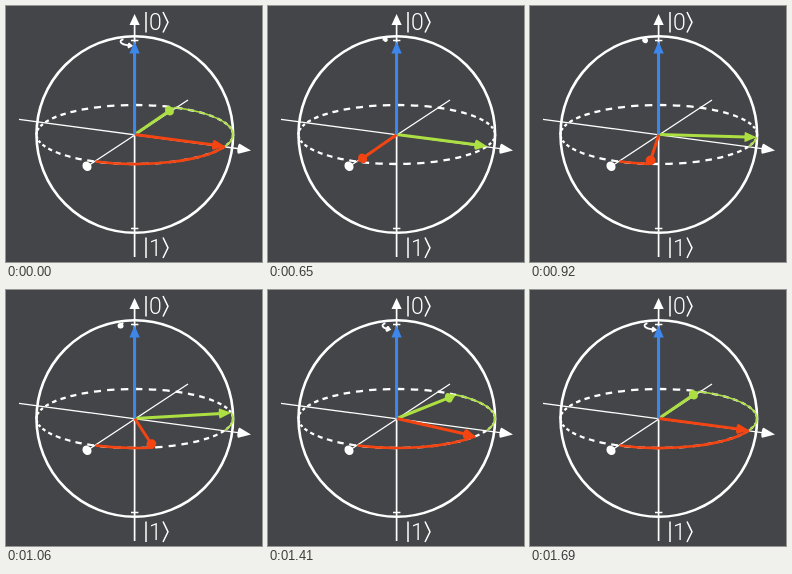
An HTML page for the animation above (1970 ms loop, 256 by 256 pixels).

```html
<!DOCTYPE html>
<html lang="en">
<head>
<meta charset="utf-8">
<title>Qubit rotation</title>
<style>
html, body { margin: 0; width: 100%; height: 100%; overflow: hidden; background: #444548; }
svg { display: block; width: 100vw; height: 100vh; }
text { font: 300 23px Roboto, "Open Sans", sans-serif; fill: #fff; text-anchor: middle; }
.line { fill: none; stroke: #fff; }
</style>
</head>
<body>
<svg viewBox="0 0 256 256">
  <rect width="256" height="256" fill="#444548"/>
  <path id="equator" class="line" stroke-width="2.3"/>
  <circle class="line" cx="128.8" cy="128.5" r="98.3" stroke-width="2.6"/>
  <path class="line" stroke-width="1.3" d="M13 113.3L235 143M81 160.5L182 94"/>
  <path class="line" stroke-width="1.7" d="M128.6 18V251M125 34.5h7.4M125 222.5h7.4"/>
  <path fill="#fff" d="M128.6 8L133.7 19H123.5Z"/>
  <path id="axisX" fill="#fff"/>
  <path id="axisY" fill="#fff"/>
  <path id="trailZ" class="line" stroke-width="1.8"/>
  <path id="headZ" fill="#fff"/>
  <g id="vectors"></g>
  <path stroke="#3d86ea" stroke-width="3" d="M128.6 128.5V46"/>
  <path fill="#3d86ea" d="M128.6 35.5L133.8 47.5H123.4Z"/>
  <path class="line" stroke-width="1.5" d="M140 6V26.5M157 6L162 16.3L157 26.5M140 231.5V252M157 231.5L162 241.8L157 252"/>
  <text x="149.5" y="24">0</text>
  <text x="149.5" y="249.5">1</text>
</svg>
<script>
const LOOP = 1970, TILT = 0.3, DEPTH = 0.954;
const CX = 128.8, CY = 128.5, R = 98.3;
const X_ANGLE = 113.6, Y_ANGLE = 23.6;
const $ = id => document.getElementById(id);
const rad = deg => deg * Math.PI / 180;
const fmt = p => p.map(v => v.toFixed(2)).join(" ");

function onRing(deg, r = R, cx = CX, cy = CY) {
  return [cx + r * Math.cos(rad(deg)), cy + r * TILT * Math.sin(rad(deg))];
}

function arc(from, to, r = R, cx = CX, cy = CY) {
  const a = onRing(from, r, cx, cy), b = onRing(to, r, cx, cy);
  return `M${fmt(a)}A${r} ${r * TILT} 0 0 ${to > from ? 1 : 0} ${fmt(b)}`;
}

// A solid cone: its base disc, foreshortened, plus the flank up to the tip
function cone(base, tip, radius, depth) {
  const dx = tip[0] - base[0], dy = tip[1] - base[1];
  const len = Math.hypot(dx, dy) || 1;
  const ox = -dy / len * radius, oy = dx / len * radius;
  const a = fmt([base[0] + ox, base[1] + oy]);
  const b = fmt([base[0] - ox, base[1] - oy]);
  const minor = Math.max(0.1, radius * Math.abs(depth));
  const turn = Math.atan2(oy, ox) * 180 / Math.PI;
  const side = `A${radius} ${minor} ${turn} 0 1 `;
  return `M${a}${side}${b}${side}${a}ZM${b}L${fmt(tip)}L${a}Z`;
}

function radialCone(deg, from, to) {
  return cone(onRing(deg, R * from), onRing(deg, R * to), 5, DEPTH * Math.sin(rad(deg)));
}

function makeVector(color, start, trailWidth) {
  const add = attrs => {
    const el = document.createElementNS("http://www.w3.org/2000/svg", "path");
    for (const k in attrs) el.setAttribute(k, attrs[k]);
    return $("vectors").appendChild(el);
  };
  const trail = add({ fill: "none", stroke: color, "stroke-width": trailWidth });
  const shaft = add({ stroke: color, "stroke-width": 3 });
  const head = add({ fill: color });
  return p => {
    const deg = start - 90 * p;
    trail.setAttribute("d", p > 0 ? arc(start, deg) : "");
    shaft.setAttribute("d", `M${CX} ${CY}L${fmt(onRing(deg, R * 0.9))}`);
    head.setAttribute("d", radialCone(deg, 0.88, 1));
  };
}

const green = makeVector("#acdf42", Y_ANGLE, 1.7);
const red = makeVector("#f34412", X_ANGLE, 2.6);

const DASHES = 44, PERIOD = 360 / DASHES;
$("equator").setAttribute("d", Array.from({ length: DASHES },
  (_, i) => arc(i * PERIOD, (i + 0.54) * PERIOD)).join(""));
$("axisX").setAttribute("d", cone([81, 160.3], [77.5, 163], 5, 0.88));
$("axisY").setAttribute("d", cone([233, 142.8], [245, 144.5], 5, 0.3));

function drawSpin(p) {
  const start = 217, deg = start - 102 * p, ring = [14.2, 128.7, 35.6];
  const a = rad(deg), base = onRing(deg, ...ring);
  const tip = [base[0] + 5 * Math.sin(a), base[1] - 5 * TILT * Math.cos(a)];
  $("trailZ").setAttribute("d", arc(start, deg, ...ring));
  $("headZ").setAttribute("d", cone(base, tip, 3, DEPTH * Math.cos(a)));
}

function progress(t) {
  if (t < 120) return 1;
  if (t < 650) return 0;
  const step = t < 720 ? 0 : Math.floor((t - 640) / 70);
  const u = Math.min(1, (step + 0.6) / 15.5);
  return (1 - Math.cos(Math.PI * u)) / 2;
}

function draw(t) {
  const p = progress(t);
  green(p);
  red(p);
  drawSpin(p);
}

let origin;
function tick(now) {
  origin ??= now;
  draw((now - origin) % LOOP);
  requestAnimationFrame(tick);
}
draw(0);
requestAnimationFrame(tick);
</script>
</body>
</html>
```
